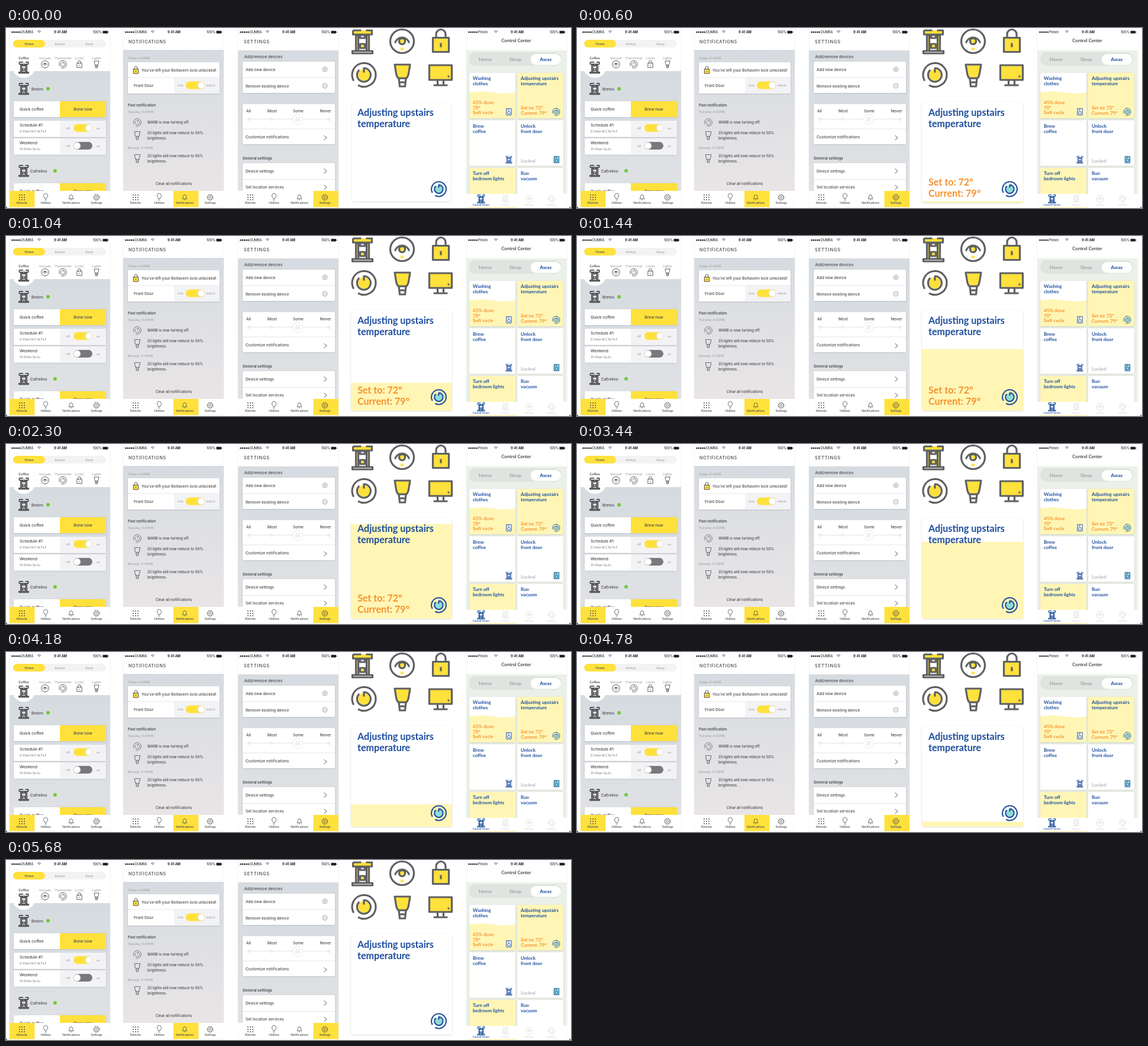
These frames come from a looping animation (955x305 px, 5700 ms). An HTML page:

```html
<!DOCTYPE html>
<html lang="en">
<head>
<meta charset="utf-8">
<title>Smart home screens</title>
<style>
html, body { margin: 0; width: 100%; height: 100%; overflow: hidden; background: #fff; }
svg { display: block; width: 955px; height: 305px; font-family: Inter, Roboto, sans-serif; font-weight: 500; }
.lato { font-family: Lato, "Open Sans", sans-serif; }
</style>
</head>
<body>
<svg id="stage" viewBox="0 0 955 305"></svg>
<script>
const YELLOW = '#ffe13c', PALE = '#fff6b6', BLUE = '#1f4e9e', ORANGE = '#f5922f', INK = '#47474a', GREY = '#a2a2a6', TEAL = '#8edcd6';
const out = [];
const add = s => out.push(s);

const rect = (x, y, w, h, fill, more = '') =>
  add(`<rect x="${x}" y="${y}" width="${w}" height="${h}" fill="${fill}" ${more}/>`);
const line = (d, color = INK, width = 0.8, more = '') =>
  add(`<path d="${d}" fill="none" stroke="${color}" stroke-width="${width}" ${more}/>`);
const dot = (x, y, r, fill, more = '') => add(`<circle cx="${x}" cy="${y}" r="${r}" fill="${fill}" ${more}/>`);
const text = (x, y, s, size = 6.5, fill = INK, more = '') =>
  add(`<text x="${x}" y="${y}" font-size="${size}" fill="${fill}" ${more}>${s}</text>`);
const mid = (x, y, s, size, fill, more = '') => text(x, y, s, size, fill, 'text-anchor="middle" ' + more);
const lato = (x, y, lines, size, fill, step, weight = 700) =>
  lines.forEach((s, i) => text(x, y + i * step, s, size, fill, `class="lato" font-weight="${weight}"`));

// Icons fit a 40-unit box around the origin.
const ICONS = {
  coffee: `<path d="M-11-11H11V16H-11Z"/><path d="M-7-11H7V16H-7Z" fill="#fff"/>
    <path d="M-16-19V-12H16V-19H6M-16-19H-2" /><path d="M-4-11V-6H4V-11" fill="none"/>
    <path d="M-4 4H4V11H-4Z"/><path d="M-17 20V16H17V20Z" fill="#fff"/>`,
  vacuum: `<circle r="20" fill="none"/><path d="M-12 3A12.4 12.4 0 0 1 12 3" fill="none"/>
    <circle r="5"/><circle cy="13" r="2.6" stroke="none"/>`,
  lock: `<path d="M-8-6V-12A8 8 0 0 1 8-12V-6" fill="none"/><rect x="-13.5" y="-6" width="27" height="24"/>
    <path d="M0 3V10"/>`,
  thermostat: `<path d="M-17.3 10A20 20 0 1 1 -10 17.3" fill="none"/><circle r="10" stroke="none"/>
    <path d="M-7.8-8.5A11.5 11.5 0 1 0 0-11.5V-4" fill="none"/>`,
  lamp: `<path d="M-6 5H6L4.5 19H-4.5Z" fill="#fff"/><path d="M-13-18H13L11-6Q10 2 7 5H-7Q-10 2-11-6Z"/>
    <path d="M-5 12H5" fill="none"/>`,
  computer: `<rect x="-19" y="-16" width="38" height="25"/><path d="M-5 9V17M5 9V17M-12 18H12M12 3H15" fill="none"/>`,
  washer: `<rect x="-14" y="-18" width="28" height="36"/><circle cy="4" r="8"/><path d="M-8-11H2"/>`
};
const icon = (name, x, y, scale, color, fill = 'none', width = 3.2) =>
  add(`<g transform="translate(${x} ${y}) scale(${scale})" stroke="${color}" fill="${fill}" stroke-width="${width}" stroke-linejoin="round">${ICONS[name]}</g>`);

const card = (x, y, w, h, fill = '#fff') => rect(x, y, w, h, fill, 'rx="1.5" filter="url(#soft)"');

function toggle(x, y, on, left, right) {
  rect(x - 16, y - 6.5, 32, 13, on ? YELLOW : '#79797c', 'rx="6.5"');
  dot(x + (on ? 10 : -10), y, 5.9, '#fff', 'stroke="#c8c8c8" stroke-width=".6"');
  mid(x - 25, y + 2, left, 4.8, GREY);
  mid(x + 26, y + 2, right, 4.8, GREY);
}

function status(x, name) {
  for (let i = 0; i < 5; i++) dot(x + 4.5 + i * 3.3, 7, 1.35, '#222');
  text(x + 20, 9, name, 5.5, '#333');
  line(`M${x + 47} 6q3-3 6 0M${x + 48.5} 7.6q1.5-1.6 3 0`, '#333', 0.8);
  mid(x + 86, 9, '9:41 AM', 5.5, '#222', 'font-weight="700"');
  text(x + 141, 9, '100%', 5.6, '#333');
  rect(x + 157.5, 4.8, 8.5, 4.4, '#222', 'rx=".8"');
  rect(x + 166.5, 6, 0.8, 2, '#222');
}

function phone(x, top, bg) {
  rect(x, 0, 170, 303.5, '#fff', 'stroke="#e8e8ea" stroke-width=".5"');
  rect(x, top, 170, 303.5 - top, bg);
}

function tabs(x, active) {
  rect(x, 276, 170, 27.5, '#fff');
  rect(x + active * 42.5, 276, 42.5, 27.5, YELLOW);
  const [a, b, c, d] = [21, 61, 104, 147].map(v => x + v);
  for (let i = 0; i < 9; i++) dot(a - 4 + i % 3 * 4, 283 + (i / 3 | 0) * 4, 0.95, INK);
  line(`M${b - 1.7} 289q0-1.5-1-2.6a3.6 3.6 0 1 1 5.4 0q-1 1.1-1 2.6zM${b - 1.5} 291.3h3`);
  line(`M${c - 4} 289.5q1.4-1 1.4-4a2.6 2.8 0 0 1 5.2 0q0 3 1.4 4zM${c - 1} 291.3h2`);
  dot(d, 287, 1.8, 'none', `stroke="${INK}" stroke-width=".7"`);
  dot(d, 287, 4.1, 'none', `stroke="${INK}" stroke-width=".7"`);
  dot(d, 287, 4.9, 'none', `stroke="${INK}" stroke-width=".9" stroke-dasharray="1.9 1.95"`);
  ['Remote', 'Utilities', 'Notifications', 'Settings'].forEach((s, i) => mid([a, b, c, d][i], 298, s, 4.9));
}

function remoteScreen() {
  phone(6, 73, 'url(#body)');
  status(6, 'DUMRA');
  rect(12, 20, 157, 13, '#f3f3f4', 'rx="6.5"');
  rect(12, 20, 54, 13, YELLOW, 'rx="6.5"');
  mid(39, 28.5, 'Home', 5.4);
  mid(91, 28.5, 'Asleep', 5.4, GREY);
  mid(141, 28.5, 'Away', 5.4, GREY);
  dot(30, 65, 19.5, '#fff');
  mid(30, 52.5, 'Coffee', 5.4, INK, 'font-weight="600"');
  icon('coffee', 30, 67, 0.48, INK);
  [['Vacuum', 66, 'vacuum'], ['Thermostat', 96, 'thermostat'], ['Locks', 124, 'lock'], ['Lights', 153, 'lamp']]
    .forEach(([s, x, name]) => { mid(x, 52.5, s, 5.3, GREY); icon(name, x, 61.5, 0.31, INK, 'none', 2.8); });
  [['Brelvo', 103, 43, 71], ['Cafrelino', 242, 41, 83]].forEach(([s, y, x, end]) => {
    icon('coffee', 30, y, 0.48, INK);
    text(x, y + 2.5, s, 6.6);
    dot(end, y, 3, '#72c83b');
  });
  [124, 263].forEach(y => {
    card(13, y, 156, 27);
    rect(91, y, 78, 27, YELLOW);
    text(23, y + 16, 'Quick coffee', 6.7);
    mid(130, y + 16, 'Brew now', 6.7);
  });
  [['Schedule #1', '8:30am M,T,W,Th,F', 157, true, 130], ['Weekend', '10:00am Sa,Su', 187, false, 130]]
    .forEach(([s, when, y, on, x]) => {
      card(13, y, 156, 27.5);
      rect(91, y, 78, 27.5, '#f3f3f5');
      text(23, y + 10, s, 6.7);
      text(23, y + 19.5, when, 4.9, '#88888c');
      toggle(x, y + 12.5, on, 'off', 'on');
    });
  tabs(6, 0);
}

function notificationScreen() {
  phone(198, 37, 'url(#warm)');
  status(198, 'DUMRA');
  text(207, 25.5, 'NOTIFICATIONS', 7.2, INK, 'letter-spacing=".65"');
  text(206, 53, 'Today, 6:30PM', 5.2, GREY);
  card(206, 58, 155, 53);
  rect(284, 84, 77, 27, '#f3f3f5');
  line('M206 84H361', '#dedee2', 0.7);
  icon('lock', 219.5, 71.5, 0.31, INK, YELLOW);
  text(229, 74, 'You’ve left your Boltavern lock unlocked!', 6.5);
  text(216, 100, 'Front Door', 6.6);
  toggle(320, 97, true, 'lock', 'unlock');
  text(206, 133, 'Past notification', 6, INK, 'font-weight="600"');
  text(206, 144, 'Tuesday, 6:30PM', 5.2, GREY);
  icon('thermostat', 222, 160, 0.32, '#707074', 'none', 3);
  text(239, 162, 'WARB is now turning off.', 6);
  text(206, 205, 'Monday, 6:30PM', 5.2, GREY);
  [180, 219].forEach(y => {
    icon('lamp', 222, y + 2, 0.36, '#707074', 'none', 3);
    text(239, y, 'Zil lights will now reduce to 50%', 6.1);
    text(239, y + 8.5, 'brightness.', 6.1);
  });
  mid(283.5, 266, 'Clear all notifications', 6.1);
  tabs(198, 2);
}

function settingsScreen() {
  phone(392, 38, 'url(#body)');
  status(392, 'DUMRA');
  text(402, 25.5, 'SETTINGS', 7.4, INK, 'letter-spacing=".9"');
  text(402.5, 50.5, 'Add/remove devices', 6.6);
  card(400, 57, 156, 53);
  line('M400 84H556', '#dcdce0', 0.7);
  text(405, 73, 'Add new device', 6.6);
  text(405, 101, 'Remove existing device', 6.5);
  [70, 98].forEach(y => { dot(539, y, 3.9, 'none', 'stroke="#77777a" stroke-width=".7"'); line(`M537 ${y}h4`, '#77777a', 0.7); });
  line('M539 68v4', '#77777a', 0.7);
  card(400, 129, 156, 68);
  line('M411 154.5H546', '#ececef', 1.4);
  [['All', 410], ['Most', 450], ['Some', 494], ['Never', 540]].forEach(([s, x], i) => {
    mid(x, 143, s, 6.6);
    dot([411, 449, 493, 546][i], 154.5, 2.8, '#ececef');
  });
  dot(493, 155, 8.5, '#fff', 'stroke="#e2e2e5" stroke-width=".8"');
  line('M490.5 151v8M493 151v8M495.5 151v8', '#d4d4d8', 0.8);
  line('M400 171H556', '#dcdce0', 0.7);
  text(405, 187, 'Customize notifications', 6.5);
  text(400, 223, 'General settings', 6.3, INK, 'font-weight="600"');
  card(400, 229, 156, 56);
  line('M400 256.5H556', '#dcdce0', 0.7);
  text(405, 244.5, 'Device settings', 6.5);
  text(405, 272, 'Set location services', 6.5);
  [186, 242.5, 270].forEach(y => line(`M537.5 ${y - 4}l4.5 4l-4.5 4`, '#555558', 1));
  tabs(392, 3);
}

function middle() {
  [['coffee', 602.5, 23], ['vacuum', 669.5, 22.5], ['lock', 735, 22.5], ['thermostat', 605, 79.5], ['lamp', 670, 80], ['computer', 734.5, 79]]
    .forEach(([name, x, y]) => icon(name, x, y, 1, '#606063', YELLOW));
  add('<rect id="tile" fill="#fff" rx="3" filter="url(#soft)"/>');
  add(`<rect id="level" x="583" width="171" fill="${PALE}" clip-path="url(#tileClip)"/>`);
  lato(594, 149, ['Adjusting upstairs', 'temperature'], 16.1, BLUE, 19);
  add('<g id="reading">');
  lato(594, 267, ['Set to: 72°', 'Current: 79°'], 16.1, ORANGE, 19);
  add('</g>');
  icon('thermostat', 731.5, 273, 0.62, BLUE, TEAL, 3.4);
}

function controlScreen() {
  phone(778, 38, '#ebf1e8');
  status(778, 'Plovin');
  mid(862.5, 24, 'Control Center', 7.7, '#333', 'class="lato" font-weight="600"');
  rect(783, 41, 156, 23, '#e0e4e0', 'rx="11.5"');
  rect(887, 44, 51, 18.5, '#fff', 'rx="9.2"');
  [['Home', 810, GREY], ['Sleep', 861, GREY], ['Away', 912.5, BLUE]]
    .forEach(([s, x, c]) => mid(x, 56, s, 8.2, c, 'class="lato" font-weight="700"'));
  [['Washing', 'clothes'], ['Adjusting upstairs', 'temperature'], ['Brew', 'coffee'], ['Unlock', 'front door'], ['Turn off', 'bedroom lights'], ['Run', 'vacuum']]
    .forEach((lines, i) => {
      const x = 783 + i % 2 * 81, y = 76 + (i >> 1) * 80.5;
      card(x, y, 78, 77, i === 1 || i === 4 ? PALE : '#fff');
      if (!i) add(`<path d="M783 109q20-3 39 0t39 0V153H783Z" fill="${PALE}"/>`);
      lato(x + 6, y + 12, lines, 8, BLUE, 9);
    });
  lato(789, 129, ['45% done', '70°', 'Soft cycle'], 8, ORANGE, 8.5);
  lato(870, 138, ['Set to: 72°', 'Current: 79°'], 8, ORANGE, 8.5);
  lato(870, 228, ['Locked'], 8, GREY, 0, 400);
  icon('washer', 850, 142, 0.3, BLUE, '#fff');
  icon('thermostat', 930, 142, 0.3, BLUE, TEAL);
  icon('coffee', 850, 223, 0.3, BLUE, '#fff');
  icon('washer', 930.5, 223, 0.3, BLUE, TEAL);
  rect(778, 281, 170, 22.5, '#fff');
  [['Control Center', 803, 'coffee'], ['Devices', 844, 'washer'], ['Settings', 884, 'vacuum'], ['Settings', 922, 'thermostat']]
    .forEach(([s, x, name], i) => {
      const c = i ? '#d9d9dd' : BLUE;
      icon(name, x, 289.5, i ? 0.28 : 0.36, c, 'none', 3);
      mid(x, 300.5, s, 4.3, c, 'class="lato" font-weight="700"');
    });
}

add(`<defs>
  <linearGradient id="body" x2="0" y2="1"><stop stop-color="#d5dbe0"/><stop offset="1" stop-color="#e1e2e5"/></linearGradient>
  <linearGradient id="warm" x2="0" y2="1"><stop stop-color="#d5dbe0"/><stop offset=".5" stop-color="#e1e1e4"/><stop offset="1" stop-color="#ebe6e7"/></linearGradient>
  <filter id="soft" x="-10%" y="-10%" width="120%" height="125%"><feDropShadow dx="0" dy=".6" stdDeviation=".9" flood-opacity=".17"/></filter>
  <clipPath id="tileClip"><rect x="583" y="125" width="171" height="171" rx="3"/></clipPath>
</defs>`);
rect(0, 0, 955, 305, '#fff');
remoteScreen();
notificationScreen();
settingsScreen();
middle();
controlScreen();
rect(0, 303, 2, 2, '#777');
rect(952, 303, 2, 2, '#777');

const get = id => document.getElementById(id);
get('stage').innerHTML = out.join('');
const tile = get('tile'), level = get('level'), reading = get('reading');
const set = (el, attrs) => Object.entries(attrs).forEach(([k, v]) => el.setAttribute(k, v));

// cubic-bezier(.25, .1, .25, 1)
function ease(x) {
  if (x <= 0) return 0;
  if (x >= 1) return 1;
  let lo = 0, hi = 1, u = 0.5;
  for (let i = 0; i < 24; i++) {
    u = (lo + hi) / 2;
    const v = 0.75 * u * (1 - u) + u ** 3;
    if (v < x) lo = u; else hi = u;
  }
  return 0.3 * u * (1 - u) ** 2 + 3 * u * u * (1 - u) + u ** 3;
}

const LOOP = 5700, RISE = 580, FALL = 3020, SPAN = 2440;
const start = performance.now();

function frame() {
  const t = (performance.now() - start) % LOOP;
  const active = t >= RISE && t < FALL;
  const inset = t < RISE ? 2 : 0;
  const height = t < RISE ? 0 : active ? 2 + 168 * ease((t - RISE) / SPAN) : 170 * (1 - ease((t - FALL) / SPAN));
  set(tile, { x: 583 + inset, y: 125 + inset, width: 171 - 2 * inset, height: 171 - 2 * inset });
  set(level, { y: 296 - height, height });
  reading.style.opacity = active ? 1 : 0;
  requestAnimationFrame(frame);
}
frame();
</script>
</body>
</html>
```
